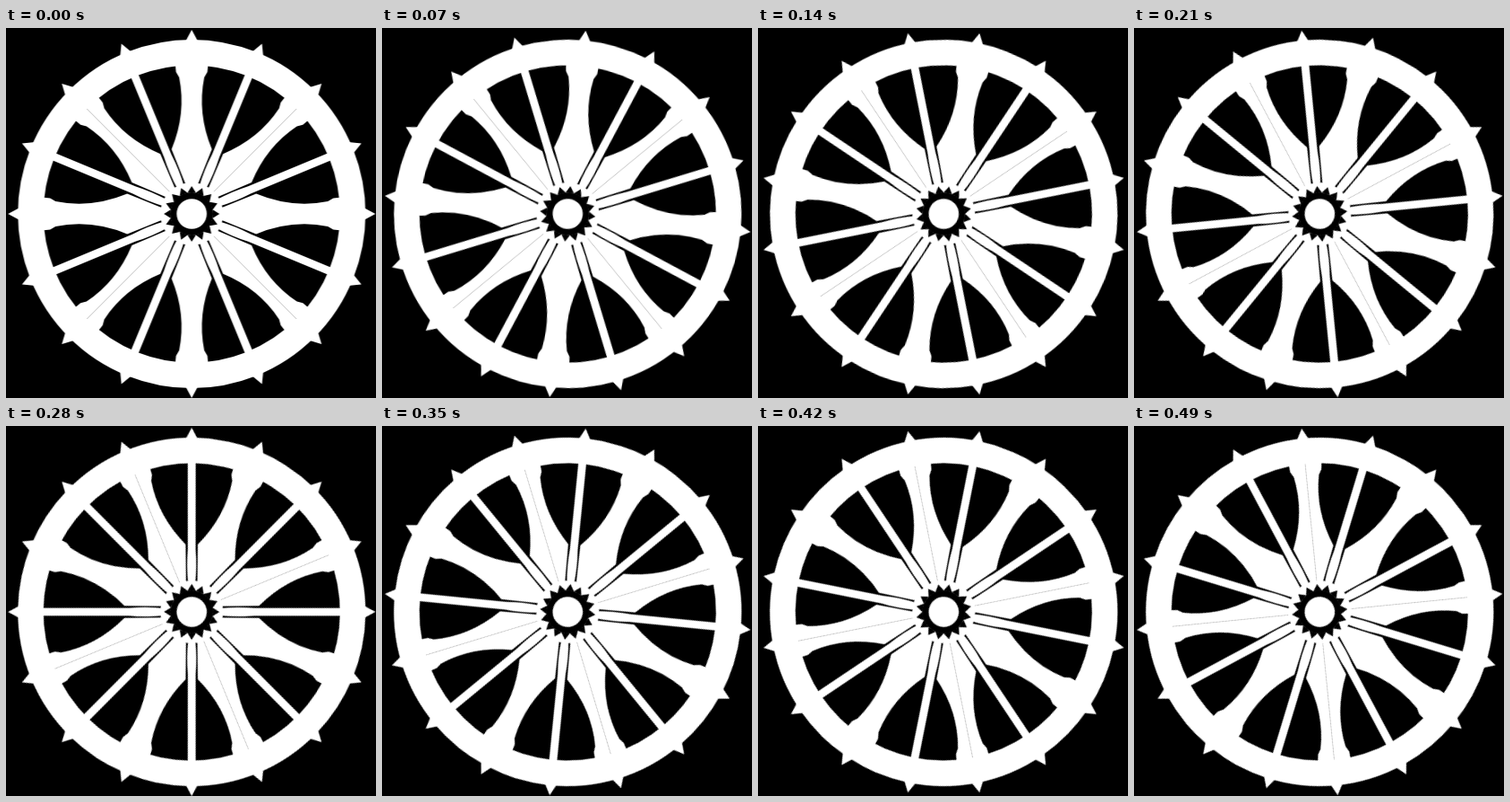
Animation of 413 by 412 pixels, one loop 560 ms. Source, as an HTML page:

```html
<!DOCTYPE html>
<html lang="en">
<head>
<meta charset="utf-8">
<title>Spinning wheel</title>
<style>
  html, body { margin: 0; width: 100%; height: 100%; overflow: hidden; background: #000; }
  svg { display: block; width: 100vw; height: 100vh; }
  #wheel { animation: turn 560ms steps(8, end) infinite; }
  /* An eighth of a turn brings the wheel back onto itself. */
  @keyframes turn { to { transform: rotate(45deg); } }
</style>
</head>
<body>
<svg viewBox="0 0 413 412">
  <defs>
    <g id="broad">
      <path id="broad-half" d="M0 -168H18.5L17.5 -158L14 -152Q5.9 -112 22.5 -72L6.8 -33H0Z"/>
      <use href="#broad-half" transform="scale(-1 1)"/>
    </g>
    <path id="thin" d="M-4.4 -168H4.4V-70Q6 -50 4 -32H-4Q-6 -50 -4.4 -70Z"/>
    <path id="spike" d="M-7 -192L0 -205L7 -192Z"/>
    <path id="notch" d="M-4.7 -23.5L0 -31L4.7 -23.5Z"/>
  </defs>
  <g transform="translate(207.3 207)">
    <g id="wheel" fill="#fff">
      <circle r="179.75" fill="none" stroke="#fff" stroke-width="28.5"/>
    </g>
  </g>
</svg>
<script>
const wheel = document.getElementById('wheel');

function add(tag, attributes) {
  const node = document.createElementNS('http://www.w3.org/2000/svg', tag);
  for (const [name, value] of Object.entries(attributes)) node.setAttribute(name, value);
  wheel.append(node);
}

function repeatAround(id, count, { offset = 0, fill = '#fff' } = {}) {
  for (let i = 0; i < count; i++) {
    add('use', { href: '#' + id, fill, transform: `rotate(${offset + i * 360 / count})` });
  }
}

repeatAround('spike', 16);
repeatAround('broad', 8);
repeatAround('thin', 8, { offset: 22.5 });

add('circle', { r: 35 });
add('circle', { r: 24, fill: '#000' });
repeatAround('notch', 16, { fill: '#000' });
add('circle', { r: 16.8 });
</script>
</body>
</html>
```
